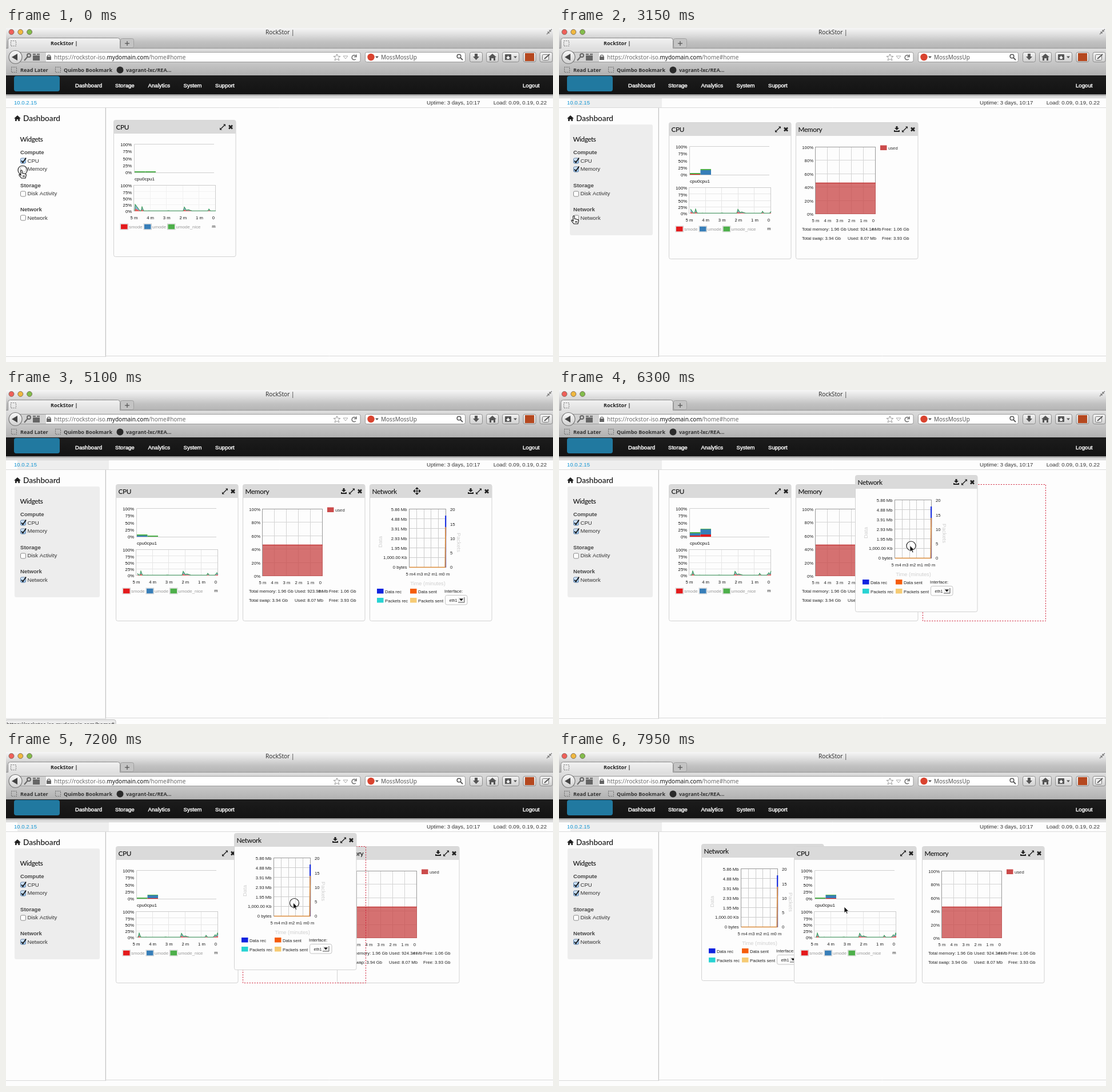
An HTML page with a canvas for the animation above (8 s loop, 957 px wide and 585 px high).

```html
<!DOCTYPE html>
<html lang="en">
<head>
<meta charset="utf-8">
<title>Dashboard</title>
<style>
html, body { margin: 0; width: 100%; height: 100%; overflow: hidden; background: #fdfdfd; }
canvas { display: block; }
</style>
</head>
<body>
<canvas id="stage" width="957" height="585"></canvas>
<script>
const ctx = document.getElementById('stage').getContext('2d');
const LOOP = 8000, STEP = 150;
const SANS = '"Liberation Sans", Arial, sans-serif';
const UI = '"Noto Sans", "Open Sans", sans-serif';
const HEAD = 'Lato, sans-serif';
const RED = '#e41a1c', BLUE = '#377eb8', GREEN = '#4daf4a';
const SLOT = [193, 415, 637], TOP = 166;

// ---- helpers ----
function text(s, x, cy, size = 7.7, color = '#222', o = {}) {
  ctx.font = `${o.weight || 400} ${size}px ${o.font || SANS}`;
  ctx.textAlign = o.align || 'left';
  ctx.letterSpacing = (o.gap || 0) + 'px';
  ctx.fillStyle = color;
  ctx.fillText(s, x, cy + size * 0.36);
  const w = ctx.measureText(s).width;
  ctx.letterSpacing = '0px';
  return x + w;
}
const heading = (s, x, cy, size, gap = 0) =>
  text(s, x, cy, size, '#111', { font: HEAD, weight: 500, gap });
function rect(x, y, w, h, color) {
  ctx.fillStyle = color;
  ctx.fillRect(x, y, w, h);
}
function round(x, y, w, h, r, fill, stroke) {
  ctx.beginPath();
  ctx.roundRect(x, y, w, h, r);
  paint(fill, stroke);
}
function paint(fill, stroke, width = 1) {
  if (fill) { ctx.fillStyle = fill; ctx.fill(); }
  if (stroke) { ctx.strokeStyle = stroke; ctx.lineWidth = width; ctx.stroke(); }
}
function box(x, y, w, h, color) {
  ctx.strokeStyle = color;
  ctx.lineWidth = 1;
  ctx.strokeRect(x, y, w, h);
}
function circle(x, y, r, fill, stroke, width) {
  ctx.beginPath();
  ctx.arc(x, y, r, 0, 7);
  paint(fill, stroke, width);
}
function line(points, color, width = 1) {
  ctx.beginPath();
  points.forEach(([x, y]) => ctx.lineTo(x, y));
  paint(null, color, width);
}
function path(d, fill, stroke, width, x = 0, y = 0) {
  ctx.save();
  ctx.translate(x, y);
  const p = new Path2D(d);
  if (fill) { ctx.fillStyle = fill; ctx.fill(p); }
  if (stroke) { ctx.strokeStyle = stroke; ctx.lineWidth = width || 1; ctx.stroke(p); }
  ctx.restore();
}
function fade(y0, y1, ...colors) {
  const g = ctx.createLinearGradient(0, y0, 0, y1);
  colors.forEach((c, i) => g.addColorStop(i / (colors.length - 1), c));
  return g;
}
function dashed(x, y, w, h, color, dash) {
  ctx.setLineDash(dash);
  box(x, y, w, h, color);
  ctx.setLineDash([]);
}
// grid lines snap to whole pixels
function grid(x, y, w, h, nx, ny, color, edge) {
  const snap = v => Math.round(v) - 0.5;
  for (let i = 1; i < nx; i++) {
    const gx = snap(x + w * i / nx);
    line([[gx, y], [gx, y + h]], color);
  }
  for (let i = 1; i < ny; i++) {
    const gy = snap(y + h * i / ny);
    line([[x, gy], [x + w, gy]], color);
  }
  box(x - 0.5, y - 0.5, w, h, edge);
}
// keys: [time, x, y]
function track(keys, t) {
  let a = keys[0];
  for (const b of keys) {
    if (t < b[0]) {
      const k = Math.max(0, (t - a[0]) / (b[0] - a[0]));
      return [a[1] + (b[1] - a[1]) * k, a[2] + (b[2] - a[2]) * k];
    }
    a = b;
  }
  return [a[1], a[2]];
}
const settle = (from, to, t, start) =>
  t < start ? from : to + (from - to) * Math.exp((start - t) / 162);

// ---- browser window ----
function toolButton(x, w) {
  round(x - w / 2, 42.5, w, 17, 3, fade(42, 60, '#f4f4f4', '#cfcfcf'), '#8c8c8c');
}
function chrome() {
  rect(0, 0, 957, 36, fade(0, 36, '#f6f6f6', '#dedede', '#c2c2c2', '#b4b4b4'));
  rect(0, 35, 957, 49, fade(35, 84, '#dedede', '#c8c8c8', '#b0b0b0'));
  line([[0, 35.5], [957, 35.5]], '#989898');
  ['#f0605a', '#f0b840', '#83bd4c'].forEach((c, i) => circle(9.5 + i * 15.8, 7, 4.5, c, '#77685c', 0.9));
  text('RockStor |', 454, 7, 10.2, '#333', { font: UI });
  path('M0 9L4 5M1 5H4V8M9 0L5 4M5 1V4H8', null, '#777', 1.1, 946, 2);

  round(3.5, 17.5, 196, 22, 4, fade(17, 37, '#f2f2f2', '#dedede'), '#8d8d8d');
  rect(3, 36, 197, 5, '#dedede');
  round(200.5, 18.5, 23, 16, 3, '#c4c4c4', '#a0a0a0');
  line([[208, 27], [216, 27]], '#555', 1.3);
  line([[212, 23], [212, 31]], '#555', 1.3);
  dashed(8.5, 22.5, 9, 9, '#777', [2, 1.5]);
  text('RockStor |', 78, 27, 9, '#222', { font: UI, weight: 700 });

  round(20, 42.5, 600, 17, 3, '#fff', '#999');
  rect(24, 43, 46, 16, '#d2d2d2');
  circle(16.5, 51, 11.5, fade(40, 63, '#f8f8f8', '#cfcfcf'), '#777', 1.2);
  path('M10 51L20 45V57Z', '#444');
  circle(40, 48, 3, null, '#666', 2);
  line([[38, 50], [32, 57]], '#666', 2);
  rect(47, 48, 12, 9, '#666');
  rect(47, 45, 5, 2, '#666');
  rect(54, 45, 5, 2, '#666');
  rect(71, 50, 8, 6, '#666');
  circle(75, 50, 2.7, null, '#666', 1.3);
  let x = text('https://rockstor-iso.', 84, 51.5, 10, '#6c6c6c', { font: UI });
  x = text('mydomain.com', x, 51.5, 10, '#111', { font: UI });
  text('/home#home', x, 51.5, 10, '#6c6c6c', { font: UI });
  path('M0-6L1.6-2H6L2.5 1 4 5.5 0 3-4 5.5-2.5 1-6-2H-1.6Z', '#fff', '#999', 1, 579, 51.5);
  path('M590 49H598L594 54Z', null, '#aaa');
  path('M4-1A4 4 0 1 0 3 3M4-5V-1H0', null, '#777', 1.6, 609, 51.5);

  round(628.5, 42.5, 175, 17, 3, '#fff', '#999');
  circle(638.5, 51, 6.2, '#d9432f');
  path('M646 49.5H652L649 53Z', '#555');
  text('MossMossUp', 656, 51.5, 10, '#555', { font: UI });
  circle(792.5, 49.5, 3.3, null, '#555', 1.6);
  line([[795, 52], [799, 56]], '#555', 1.8);

  [[822.5, 22], [851, 21], [883, 29], [916, 22], [945, 22]].forEach(b => toolButton(...b));
  path('M820 45H825V50H828L822.5 56 817 50H820Z', '#555');
  path('M851 45L858 51H856V57H853V53H849V57H846V51H844Z', '#555');
  round(873, 46, 11, 10, 1, '#555');
  path('M878.5 48L880 51H882L880 53 881 55 878.5 54 876 55 877 53 875 51H877Z', '#fff');
  path('M888 49.5H894L891 53Z', '#555');
  rect(908, 44, 16, 14, '#b5481f');
  round(938.5, 46.5, 11, 10, 2, '#eee', '#777');
  line([[942, 54], [951, 46]], '#555', 1.8);

  const bm = { font: UI, weight: 700 };
  dashed(9.5, 68.5, 9, 9, '#666', [2, 1.5]);
  text('Read Later', 25, 73.5, 9, '#333', bm);
  dashed(86.5, 68.5, 9, 9, '#666', [2, 1.5]);
  text('Quimbo Bookmark', 101, 73.5, 9, '#333', bm);
  circle(199.5, 73.5, 6, '#2b2b2b');
  text('vagrant-lxc/REA...', 210, 73.5, 9, '#333', bm);
}

// ---- page frame ----
function checkbox(y, on) {
  round(25.5, y - 4.5, 9, 9, 2, on ? fade(y - 5, y + 5, '#e4f0fb', '#8fbde8') : '#fdfdfd', on ? '#5f7fa5' : '#8a8a8a');
  if (on) path('M27 0L29.5 3L35-5', null, '#111', 1.8, 0, y);
}
function page(t) {
  rect(0, 83, 957, 33, fade(83, 116, '#1c1c1c', '#131313'));
  rect(0, 116, 957, 7, fade(116, 123, '#8c8c8c', '#d4d4d4', '#f4f4f4'));
  round(14, 84, 80, 27, 4, '#2179a0');
  const menu = [['Dashboard', 121], ['Storage', 191], ['Analytics', 248.5], ['System', 310.5], ['Support', 366], ['Logout', 904]];
  menu.forEach(([s, x]) => {
    text(s, x, 100.5, 9.65, '#fff');
    ctx.strokeStyle = '#fff';
    ctx.lineWidth = 0.4;
    ctx.strokeText(s, x, 100.5 + 9.65 * 0.36);
  });
  const open = t >= 600;
  if (open) rect(20, 123, 160, 16, '#eeeeee');
  line([[0, 122.5], [957, 122.5]], '#d0d0d0');
  line([[0, 139.5], [957, 139.5]], '#dadada');
  text('10.0.2.15', 14, 130.5, 9.6, '#0f93d2');
  text('Uptime: 3 days, 10:17', 736, 130.5, 9.6, '#333');
  text('Load: 0.09, 0.19, 0.22', 946, 130.5, 9.6, '#333', { align: 'right' });
  line([[174.5, 140], [174.5, 576]], '#c4c4c4');
  line([[173.5, 140], [173.5, 576]], '#ececec');
  line([[0, 575.5], [174, 575.5]], '#d8d8d8');
  line([[174, 574.5], [957, 574.5]], '#d8d8d8');

  if (open) {
    const left = t < 2700 ? 21 : t < 4800 ? 19 : 15;
    round(left, 169, 164 - left, 194, 3, '#ededed');
  }
  path('M20 153L26 158.5H24V163H21.3V160H18.7V163H16V158.5H14Z', '#222');
  heading('Dashboard', 30, 158.5, 13.6);
  heading('Widgets', 24.5, 194.5, 11.6, -0.4);
  [['Compute', 218], ['Storage', 275.5], ['Network', 318]].forEach(([s, y]) => text(s, 25, y, 9.6, '#444', { weight: 700 }));
  [['CPU', 232.5, 0], ['Memory', 247, 450], ['Disk Activity', 290, LOOP], ['Network', 332.5, 3300]].forEach(([s, y, at]) => {
    checkbox(Math.floor(y) + 0.5, t >= at);
    text(s, 37.5, y, 9.6, '#333');
  });
}

// ---- widgets ----
function frame(title, save) {
  round(-0.5, -0.5, 213.5, 239, 3, '#fdfdfd', '#d2d2d2');
  round(-0.5, -0.5, 213.5, 23.5, [3, 3, 0, 0], '#dadada');
  heading(title, 3.5, 12, 11.8, -0.35);
  if (save) path('M-1.5-5H1.5V-2H4L0 2-4-2H-1.5ZM-5 2H-3V3H3V2H5V5H-5Z', '#222', null, 0, 176, 11);
  path('M5-5V-1L1-5ZM-5 5V1L-1 5Z', '#222', null, 0, 190, 11.5);
  line([[187, 14.5], [193, 8.5]], '#222', 1.4);
  line([[201, 8.5], [207, 14.5]], '#222', 2.6);
  line([[207, 8.5], [201, 14.5]], '#222', 2.6);
}
function swatch(x, y, color, label, tint, size) {
  rect(x, y - 4.5, 11.5, 8.5, color);
  text(label, x + 14, y + 0.3, size, tint);
}

// per state: time shift of the history, then red/blue/green heights per core
const LOADS = [
  [0, 0, 0, 2, 0, 0, 2],
  [3, 1, 0, 2, 0, 8, 2],
  [6, 0, 2, 2, 0, 0, 2],
  [8, 2, 4, 2, 4, 9, 1],
  [9, 0, 0, 2, 1, 5, 1]
];
// history peaks: position, height, rise, fall
const PEAKS = [[2, 12, 1, 9], [7, 4, 2, 5], [14, 8, 2, 3], [26, 1, 2, 3], [60, 1, 9, 12],
  [88, 7.5, 2, 5], [94, 3, 3, 10], [131, 4, 2, 3], [147, 5, 4, 3], [151, 8, 3, 3]];
function usage(x) {
  let v = 0.8;
  for (const [p, h, rise, fall] of PEAKS) {
    const d = x - p;
    v = Math.max(v, h * (1 - (d < 0 ? -d / rise : d / fall)));
  }
  return v;
}
function cpu(n) {
  frame('CPU');
  const [shift, ...bars] = LOADS[n];
  const right = { align: 'right' }, mid = { align: 'center' };
  for (let i = 0; i < 5; i++) {
    const s = 100 - i * 25 + '%';
    text(s, 31, 42.5 + i * 12.2, 7.7, '#111', right);
    text(s, 31, 114.5 + i * 11.3, 7.7, '#111', right);
  }
  line([[175, 41.5], [35.5, 41.5], [35.5, 91.5], [175, 91.5]], '#cfcfcf');
  for (let c = 0; c < 2; c++) {
    let y = 91;
    [RED, BLUE, GREEN].forEach((color, i) => {
      const h = bars[c * 3 + i];
      y -= h;
      rect(36 + c * 18.5, y, 18.5, h, color);
    });
  }
  text('cpu0cpu1', 36, 102, 8.1, '#111');

  grid(35, 114, 143, 45, 5, 4, n ? '#e6e6e6' : '#f2f2f2', '#cccccc');
  const top = [], low = [];
  for (let x = n ? 2 : 1; x <= 143; x++) {
    const v = usage(x + shift);
    top.push([35 + x, 159 - v]);
    low.push([35 + x, 159 - v * 0.4]);
  }
  [[top, 'rgba(55,126,184,.6)'], [low, '#e8605e']].forEach(([pts, color]) => {
    ctx.beginPath();
    ctx.moveTo(pts[0][0], 159);
    pts.forEach(p => ctx.lineTo(...p));
    ctx.lineTo(178, 159);
    paint(color);
  });
  line(top, '#3f9f5c', 1.1);
  for (let i = 0; i < 6; i++) text(i < 5 ? 5 - i + ' m' : '0', 35 + i * 28.6 - (i === 5 ? 4 : 0), 170.7, 7.7, '#111', mid);
  text('m', 174.5, 185, 7.7, '#111', mid);
  [[12, RED, 'smode'], [53, BLUE, 'umode'], [94.5, GREEN, 'umode_nice']].forEach(([x, c, s]) => {
    box(x - 1, 181, 13.5, 10, '#ccc');
    swatch(x, 186.3, c, s, '#999', 7.9);
  });
}

function memory(ready, used) {
  frame('Memory', true);
  if (!ready) {
    ['Total memory:', 'Total swap:'].forEach((s, i) => {
      const y = 186.7 + i * 16;
      text(s, 10, y);
      text('Used:', 60, y);
      text('Free:', 82, y);
    });
    return;
  }
  grid(34, 43, 105, 117, 5, 5, '#d4d4d4', '#999');
  rect(34, 106, 105, 54, 'rgba(203,75,75,.78)');
  line([[34, 105.5], [139, 105.5]], '#c23c3c', 1.4);
  for (let i = 0; i < 6; i++) {
    text(100 - i * 20 + '%', 30, 43.3 + i * 23.4, 7.7, '#222', { align: 'right' });
    text(i < 5 ? 5 - i + ' m' : '0', 34 + i * 21 - (i === 5 ? 4 : 0), 171.7, 7.7, '#222', { align: 'center' });
  }
  swatch(147, 44, '#cb4b4b', 'used', '#333');
  text('Total memory: 1.96 Gb', 10, 186.7);
  text(`Used: ${used} Mb`, 90, 186.7);
  text('m', 135, 186.7, 7.7, '#222', { align: 'center' });
  text('Free: 1.06 Gb', 150, 186.7);
  text('Total swap: 3.94 Gb', 10, 202.7);
  text('Used: 8.07 Mb', 90, 202.7);
  text('Free: 3.93 Gb', 150, 202.7);
}

function turned(s, x, y, angle) {
  ctx.save();
  ctx.translate(x, y);
  ctx.rotate(angle);
  text(s, 0, 0, 9.5, '#cfcfcf', { align: 'center' });
  ctx.restore();
}
function network(ready) {
  frame('Network', true);
  if (!ready) return;
  grid(69, 43, 64, 102, 5, 6, '#cccccc', '#999');
  line([[69, 144.5], [132, 144.5]], '#d98a3a', 1.6);
  line([[132, 145], [132.2, 54]], '#1a2fe0', 2.2);
  line([[131.5, 145], [132.2, 74]], '#d8924a', 2);
  ['5.86 Mb', '4.88 Mb', '3.91 Mb', '2.93 Mb', '1.95 Mb', '1,000.00 Kb', '0 bytes'].forEach((s, i) =>
    text(s, 64.5, 43.7 + i * 16.8, 7.7, '#222', { align: 'right' }));
  for (let i = 0; i < 5; i++) text(20 - i * 5, 140, 43.7 + i * 25.2);
  for (let i = 0; i < 6; i++) text(5 - i + ' m', 69 + i * 12.8, 156.2, 7.7, '#222', { align: 'center' });
  text('Time (minutes)', 101, 172.2, 9.3, '#cfcfcf', { align: 'center' });
  turned('Data', 18, 100, -Math.PI / 2);
  turned('Packets', 155, 101, Math.PI / 2);
  swatch(12, 186.5, '#1024e0', 'Data rec');
  swatch(70, 186.5, '#f55c0a', 'Data sent');
  swatch(12, 202.5, '#27d3d3', 'Packets rec');
  swatch(70, 202.5, '#f6cb74', 'Packets sent');
  text('Interface:', 130, 186.3);
  round(131.5, 193.5, 38.5, 16.5, 3, '#fdfdfd', '#c4c4c4');
  text('eth1', 138.5, 202.3, 7.2);
  rect(154, 197, 11, 9, '#eee');
  line([[154, 206], [165, 206], [165, 197]], '#555');
  path('M156 199.5H163L159.5 203.5Z', '#111');
}

// ---- pointer ----
const POINTER = [[0, 27, 249], [600, 27, 249], [750, 27, 272], [1350, 27, 272], [2250, 27, 293],
  [2700, 26, 329], [3600, 26, 329], [4200, 250, 250], [4650, 603, 178], [4800, 612, 177],
  [4950, 719, 177], [5100, 719, 177], [5400, 726, 288], [5850, 728, 289], [6750, 500, 256],
  [6900, 508, 257], [7500, 497, 271], [7700, 499, 271]];
const DRAG = [[5850, 637, 166], [6750, 401, 133], [6900, 411, 132], [7500, 389, 153]];
const RELEASE = 7750;

function shape(t) {
  if (t < 750) return 'hand';
  if (t < 2100) return 'beam';
  if (t < 3750) return 'hand';
  if (t < 4650) return 'arrow';
  if (t < 4950) return 'hand';
  return t < 5250 ? 'move' : 'arrow';
}
function pointer(t) {
  const [x, y] = track(POINTER, t);
  const kind = shape(t);
  const ring = t < 150 || t === 3000 || (t >= 6000 && t < RELEASE);
  if (ring) circle(x + 2, y + (kind === 'hand' ? 0 : 0.5), 8, 'rgba(255,255,255,.35)', '#222', 1.2);
  if (kind === 'hand')
    path('M-1.5 1Q0-1 1.2 1V5L6 6.2Q8.5 6.5 8.3 9L7 14H0L-4 9Q-4.5 6.5-2.5 7.5L-1 9Z M3 9V12M5 9V12', '#fff', '#111', 1.1, x, y);
  else if (kind === 'beam')
    path('M-2-5Q0-5 0-3Q0-5 2-5M0-3V4M-2 6Q0 6 0 4Q0 6 2 6M-1 1H1', null, '#111', 1, x, y);
  else if (kind === 'move')
    path('M-5 0H5M0-5V5M-2-4L0-6 2-4ZM-2 4L0 6 2 4ZM-4-2L-6 0-4 2ZM4-2L6 0 4 2Z', '#111', '#111', 1.1, x, y);
  else
    path('M0 0V11L2.6 8.6 4.4 12.4 6.2 11.5 4.5 8H8Z', '#111', '#fff', 0.8, x, y);
}

// ---- scene ----
function at(x, y, draw) {
  ctx.save();
  ctx.translate(Math.round(x), Math.round(y));
  draw();
  ctx.restore();
}
function widgets(t) {
  const load = t < 600 ? 0 : t < 4200 ? 1 : t < 5400 ? 2 : t < 7200 ? 3 : 4;
  const used = t < 4200 ? '924.14' : t < 5400 ? '923.98' : '924.34';
  const drawCpu = () => t < 600
    ? at(189, 162, () => cpu(load))
    : at(settle(SLOT[0], SLOT[1], t, 7270), TOP, () => cpu(load));
  const drawMemory = () => t >= 600 &&
    at(settle(SLOT[1], SLOT[2], t, 6981), TOP, () => memory(t >= 1650, used));
  const drawNetwork = () => {
    if (t < 3300) return;
    const [x, y] = track(DRAG, t);
    at(settle(x, SLOT[0], t, RELEASE), settle(y, TOP, t, RELEASE), () => network(t >= 3900));
  };
  ctx.save();
  ctx.beginPath();
  ctx.rect(175, 140, 782, 434);
  ctx.clip();
  const dragging = t >= 6000 && t < RELEASE;
  if (!dragging) drawNetwork();
  drawCpu();
  drawMemory();
  if (dragging) {
    const slot = SLOT[t < 6900 ? 2 : t < 7270 ? 1 : 0];
    dashed(slot - 0.5, 165.5, 215, 239, '#d02038', [2.2, 2.2]);
    drawNetwork();
  }
  ctx.restore();
}
function draw(t) {
  rect(0, 0, 957, 585, '#fdfdfd');
  chrome();
  page(t);
  widgets(t);
  if (t >= 4800 && t < 5250) {
    round(-1, 577.5, 193, 12, 3, '#ececec', '#bbb');
    text('https://rockstor-iso.mydomain.com/home#', 1, 585.5, 9.3, '#333', { font: UI });
  }
  pointer(t);
}
function tick() {
  const t = performance.now() % LOOP;
  draw(Math.floor(t / STEP) * STEP);
  requestAnimationFrame(tick);
}
tick();
</script>
</body>
</html>
```
